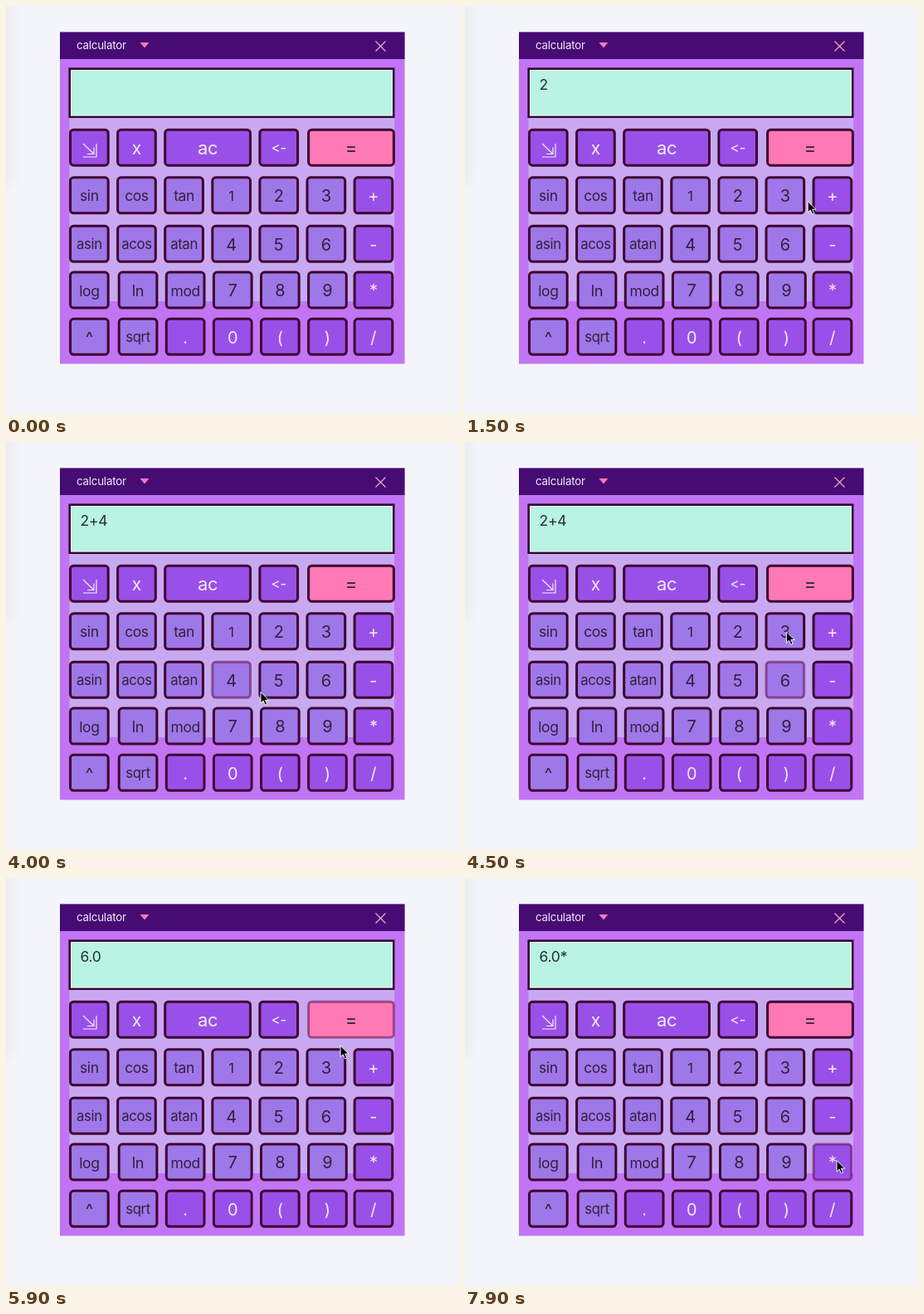
Write an HTML page that moves like this. It is 546 px wide and 492 px high and loops after 8000 ms.

```html
<!DOCTYPE html>
<html lang="en">
<head>
<meta charset="utf-8">
<title>Calculator</title>
<style>
  html, body { margin: 0; width: 100%; height: 100%; overflow: hidden; background: #f3f5fb; }
  svg { display: block; width: 546px; height: 492px; }
  text { font-family: Inter, "Open Sans", sans-serif; }
</style>
</head>
<body>
<svg viewBox="0 0 546 492">
  <defs>
    <filter id="soft" x="-50%" y="-50%" width="200%" height="200%"><feGaussianBlur stdDeviation="7"/></filter>
  </defs>
  <rect width="546" height="492" fill="#f3f5fb"/>
  <rect x="-80" y="-60" width="88" height="280" rx="16" fill="#eaecf1" filter="url(#soft)"/>
  <rect x="65" y="31.5" width="415.5" height="400" fill="#c175f5"/>
  <rect x="65" y="31.5" width="415.5" height="32.5" fill="#460c73"/>
  <text x="85" y="52" font-size="13.3" letter-spacing="-.2" fill="#f4ecfc">calculator</text>
  <path d="M161.5 44h11l-5.5 6.5z" fill="#ff79b9"/>
  <path d="M445.5 42.5l12 12m0-12l-12 12" stroke="#f0a0cc" stroke-width="1.3"/>
  <rect x="76.5" y="76" width="391.5" height="280" fill="#c8a9f1"/>
  <rect x="76.7" y="75.7" width="390.5" height="58" fill="#b9f3e3" stroke="#35052c" stroke-width="2.6"/>
  <rect x="78.5" y="77.5" width="386.900" height="54.400" fill="none" stroke="#e9fbf6"/>
  <text id="display" x="89.5" y="101" font-size="17.5" letter-spacing="-.25" fill="#22302e"></text>
  <g id="keys"></g>
  <path d="M93 166l13 12.500m-8 0h8v-8m-13 11.500h16v-16" fill="none" stroke="#f4ecfc" stroke-width="1.2"/>
  <path id="cursor" d="M0 0V15.500L3.600 12.200L6.200 18L8.900 16.800L6.300 11.200H11.200Z"
        fill="#000" stroke="#fff" stroke-width="1.1" stroke-linejoin="round"/>
</svg>
<script>
const LOOP = 8000, STEP = 100;
const LIGHT = "#9e78e8", DEEP = "#9950e8", PINK = "#ff79b5";
const PITCH = 57.1, KEY_W = 48.7, KEY_H = 46;
const byId = id => document.getElementById(id);
const keys = [];

function add(name, attrs) {
  const el = document.createElementNS("http://www.w3.org/2000/svg", name);
  for (const k in attrs) el.setAttribute(k, attrs[k]);
  return byId("keys").appendChild(el);
}

const column = i => 76 + PITCH * i;

function addKey(label, x, y, fill, size, span = 1) {
  const w = KEY_W + PITCH * (span - 1);
  const box = add("rect", {
    x: x + 1.5, y: y + 1.5, width: w - 3, height: KEY_H - 3, rx: 4, fill, "stroke-width": 3
  });
  add("text", {
    x: x + w / 2, y: y + KEY_H / 2 + 0.8 + size * 0.35, "font-size": size,
    "text-anchor": "middle", "letter-spacing": label.length > 1 ? -0.4 : 0,
    fill: fill === DEEP ? "#f4ecfc" : "#33203f"
  }).textContent = label;
  keys.push({ box, x, y, w });
}

const TOP = 147.7;
addKey("", column(0), TOP, DEEP, 20);
addKey("x", column(1), TOP, DEEP, 21);
addKey("ac", column(2), TOP, DEEP, 22, 2);
addKey("<-", column(4), TOP, DEEP, 17);
addKey("=", column(5) + 1.6, TOP, PINK, 22, 2);

const rows = {
  205.3: "sin cos tan 1 2 3 +",
  263.8: "asin acos atan 4 5 6 -",
  319.6: "log ln mod 7 8 9 *",
  375.8: "^ sqrt . 0 ( ) /"
};
Object.keys(rows).forEach((top, r) => rows[top].split(" ").forEach((label, i) => {
  const deep = i === 6 || (r === 3 && i > 1);
  const size = label.length > 1 ? 19.6 - label.length * 0.7 : label === "1" ? 16.5 : 20;
  // The middle keys of the lower rows sit slightly to the right
  const shift = r > 1 && i > 0 && i < 6 ? 1.6 : 0;
  addKey(label, column(i) + shift, Number(top), deep ? DEEP : LIGHT, size);
}));

// Pointer moves: start and end time, then where it comes to rest
const home = { x: 345, y: 500 };
const moves = [
  [100, 900, 328, 235.5],
  [1300, 1600, 443, 235.5],
  [2200, 2600, 270, 278],
  [3900, 4100, 344, 325],
  [4200, 4700, 411, 176.5],
  [5600, 6400, 386, 258],
  [6400, 6700, 451.5, 297],
  [6800, 7100, 442, 398],
  [7500, 7700, 448, 340.5]
];
const typed = { 0: "", 1200: "2", 2100: "2+", 3000: "2+4", 4900: "6.0", 7700: "6.0*" };

function ease(t, from, to) {
  const k = Math.min(1, Math.max(0, (t - from) / (to - from)));
  return k * k * (3 - 2 * k);
}

function pointer(t) {
  return moves.reduce((p, [from, to, x, y]) => {
    const k = ease(t, from, to);
    return { x: p.x + (x - p.x) * k, y: p.y + (y - p.y) * k };
  }, home);
}

function draw(time) {
  const t = Math.floor((time % LOOP) / STEP) * STEP;
  const p = pointer(t);
  byId("cursor").setAttribute("transform", `translate(${p.x} ${p.y}) scale(.87)`);

  // Highlights trail the pointer by one step
  const q = pointer(t - STEP);
  for (const { box, x, y, w } of keys) {
    const over = q.x >= x && q.x <= x + w && q.y >= y && q.y <= y + KEY_H;
    box.setAttribute("stroke", over ? "#5a003c" : "#3f0330");
    box.setAttribute("stroke-opacity", over ? 0.5 : 1);
  }
  const last = Object.keys(typed).filter(s => s <= t).pop();
  byId("display").textContent = typed[last];
}

const start = performance.now();
function tick() {
  draw(performance.now() - start);
  requestAnimationFrame(tick);
}
tick();
</script>
</body>
</html>
```
